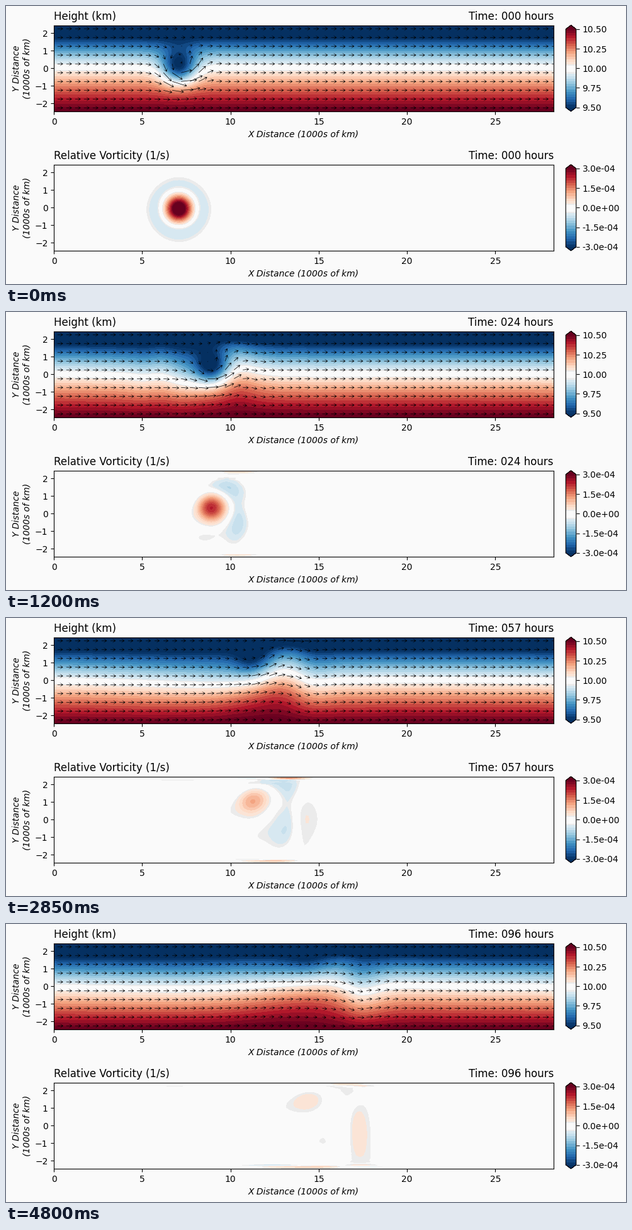
A matplotlib script for the animation above (4.85 s loop, 985 by 443 pixels).

```python
import numpy as np
import matplotlib
import matplotlib.pyplot as plt
from matplotlib.animation import FuncAnimation
from matplotlib.cm import ScalarMappable
from matplotlib.colors import BoundaryNorm, ListedColormap

W, H = 985, 443
HOURS = 97
PAPER, HAZE = "#fafafa", "#ebebeb"

# Shallow-water channel on a beta plane
G, F0, BETA = 9.81, 1.03e-4, 1.62e-11
WIND, DEPTH, DIP = 25.0, 10000.0, 500.0
NX, NY, DX, DT = 284, 50, 100e3, 60.0
STEPS = int(3600 / DT)
K = DT / (2 * DX)

x = np.arange(NX) * DX
y = (np.arange(NY) - (NY - 1) / 2) * DX
coriolis = (F0 + BETA * y)[:, None]
F = coriolis[1:-1].astype("f4")
INNER = (slice(1, -1), slice(1, -1))


def diff_x(a):
    return a[:, 1:] - a[:, :-1]


def diff_y(a):
    return a[1:] - a[:-1]


def half_x(q, flux):
    q, flux = q[1:-1], flux[1:-1]
    return 0.5 * (q[:, 1:] + q[:, :-1]) - K * diff_x(flux)


def half_y(q, flux):
    q, flux = q[:, 1:-1], flux[:, 1:-1]
    return 0.5 * (q[1:] + q[:-1]) - K * diff_y(flux)


def wrap(a):
    a[:, 0] = a[:, -2]
    a[:, -1] = a[:, 1]


def initial_state():
    """Geostrophic cyclone in a uniform westerly wind."""
    r2 = (x - x.max() / 4) ** 2 + y[:, None] ** 2
    h = (DEPTH - WIND / G * (F0 * y + 0.5 * BETA * y**2)[:, None]
         - DIP * np.exp(-r2 / (2 * (7 * DX) ** 2)))
    u = -G / coriolis * np.gradient(h, DX, axis=0)
    v = G / coriolis * np.gradient(h, DX, axis=1)
    u[0], u[-1] = u[1], u[-2]
    v[0] = v[-1] = 0
    return [a.astype("f4") for a in (u, v, h)]


def step(u, v, h):
    """One Lax-Wendroff step, in place; the wall rows stay fixed."""
    uh, vh = u * h, v * h
    p = 0.5 * G * h * h
    uv = uh * v
    uu, vv = uh * u + p, vh * v + p

    hx, hy = half_x(h, uh), half_y(h, vh)
    ux, uy = half_x(uh, uu), half_y(uh, uv)
    vx, vy = half_x(vh, uv), half_y(vh, vv)

    h_new = h[INNER] - 2 * K * (diff_x(ux) + diff_y(vy))
    push = (0.5 * DT) * F * (h[INNER] + h_new)
    u_flux = diff_x(ux * ux / hx + 0.5 * G * hx * hx) + diff_y(uy * vy / hy)
    v_flux = diff_x(ux * vx / hx) + diff_y(vy * vy / hy + 0.5 * G * hy * hy)
    u_new = (uh[INNER] - 2 * K * u_flux + push * v[INNER]) / h_new
    v_new = (vh[INNER] - 2 * K * v_flux - push * u[INNER]) / h_new

    u[INNER], v[INNER], h[INNER] = u_new, v_new, h_new
    for a in (u, v, h):
        wrap(a[1:-1])


def vorticity(u, v):
    z = np.zeros((NY, NX))
    z[INNER] = (u[:-2, 1:-1] - u[2:, 1:-1] + v[1:-1, 2:] - v[1:-1, :-2]) / DX
    return z


def simulate():
    u, v, h = initial_state()
    states = []
    for hour in range(HOURS):
        states.append((u.copy(), v.copy(), h / 1000, vorticity(u, v)))
        if hour < HOURS - 1:
            for _ in range(STEPS):
                step(u, v, h)
    return states


# Band edges from -1 to 1, finer next to the blank middle band
edges = np.r_[np.arange(-30, -3, 2), -3, 2, np.arange(3, 30, 2), 30] / 30


def band_colors():
    mids = (edges[1:] + edges[:-1]) / 2
    ramp = matplotlib.colormaps["RdBu_r"]
    colors = [ramp((m + 1) / 2) for m in [-1.0, *mids, 1.0]]
    blank = 1 + int(np.argmin(abs(mids)))
    colors[blank - 1:blank + 2] = [HAZE, PAPER, HAZE]
    return ListedColormap(colors)


def box(left, top, width, height):
    return [left / W, 1 - (top + height) / H, width / W, height / H]


cmap = band_colors()
xk, yk = x / 1e6, y / 1e6
states = simulate()

plt.rcParams["font.family"] = "DejaVu Sans"
fig = plt.figure(figsize=(W / 100, H / 100), dpi=100, facecolor=PAPER)


class Panel:
    def __init__(self, top, name, middle, reach, fmt):
        self.ax = fig.add_axes(box(76.2, top, 793.7, 137.3), facecolor=PAPER)
        self.ax.set(xlim=(xk[0], xk[-1]), ylim=(yk[0], yk[-1]),
                    xticks=range(0, 26, 5), yticks=range(-2, 3))
        self.ax.set_xlabel("X Distance (1000s of km)", style="italic")
        self.ax.set_ylabel("Y Distance\n(1000s of km)", style="italic")
        self.ax.set_title(name, loc="left")
        self.clock = self.ax.set_title("Time: 000 hours", loc="right")

        self.levels = middle + reach * edges
        self.norm = BoundaryNorm(self.levels, cmap.N, extend="both")
        cax = fig.add_axes(box(889.3, top, 16.5, 137.3))
        bar = fig.colorbar(ScalarMappable(self.norm, cmap), cax=cax,
                           spacing="proportional", format=fmt,
                           ticks=middle + reach * np.linspace(-1, 1, 5))
        bar.minorticks_off()
        self.fill = None

    def show(self, field, hour):
        if self.fill is not None:
            self.fill.remove()
        self.fill = self.ax.contourf(xk, yk, field, levels=self.levels,
                                     cmap=cmap, norm=self.norm,
                                     extend="both", zorder=0)
        self.clock.set_text(f"Time: {hour:03d} hours")


height = Panel(30.6, "Height (km)", 10, 0.5, "%.2f")
spin = Panel(252.7, "Relative Vorticity (1/s)", 0, 3e-4, "%.1e")

SKIP = (slice(2, None, 5), slice(2, None, 5))
arrows = height.ax.quiver(xk[2::5], yk[2::5], states[0][0][SKIP],
                          states[0][1][SKIP], scale=2200, width=0.0009,
                          headwidth=10, headlength=8, headaxislength=3,
                          zorder=1.5)


def draw(hour):
    u, v, h, z = states[hour]
    height.show(h, hour)
    spin.show(z, hour)
    arrows.set_UVC(u[SKIP], v[SKIP])
    return []


anim = FuncAnimation(fig, draw, frames=HOURS, interval=50,
                     init_func=lambda: draw(0), repeat=True, repeat_delay=0)
plt.show()
```
